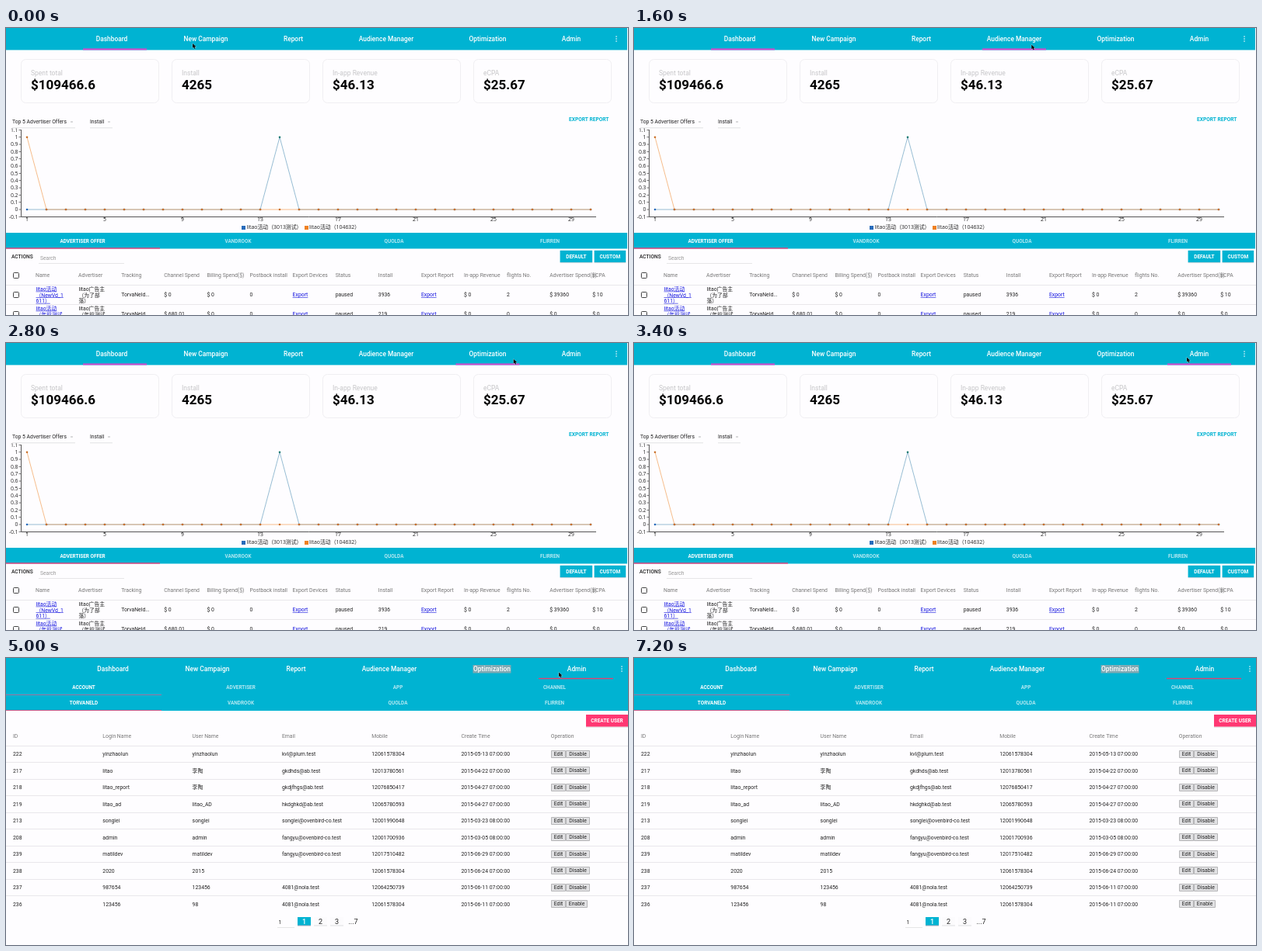
Write an HTML page with a canvas that moves like this. It is 800 by 370 pixels and loops after 7300 ms.

```html
<!DOCTYPE html>
<html lang="zh-CN">
<head>
<meta charset="utf-8">
<title>Campaign dashboard</title>
<style>
html, body { margin: 0; width: 100%; height: 100%; overflow: hidden; background: #fefdff; }
canvas { display: block; }
</style>
</head>
<body>
<canvas id="stage" width="800" height="370"></canvas>
<script>
const ctx = document.getElementById('stage').getContext('2d');
const LOOP = 7300, STEP = 100, PAGE_SWITCH = 3500, CURSOR_GONE = 6000;
const TEAL = '#00b3d2', PINK = '#ff3873', MAGENTA = '#d548cb';
const INK = '#222', GREY = '#777', RULE = '#e4e3e6', LINK = '#1515df';
const ORANGE = '#ef8122', BLUE = '#286bbb';
const SANS = 'Roboto, "Noto Sans CJK SC", "Noto Sans CJK", sans-serif';
const CHART_FONT = '"Open Sans", "Noto Sans CJK SC", "Noto Sans CJK", sans-serif';

const NAV = ['Dashboard', 'New Campaign', 'Report', 'Audience Manager', 'Optimization', 'Admin'];
const HOME_NAV = [136, 257, 369.5, 489, 619.5, 727];
const ADMIN_NAV = [137.5, 259, 373, 493, 625, 734];
const NETWORKS = ['VANDROOK', 'QUOLDA', 'FLIRREN'];

function box(x, y, w, h, color) {
  ctx.fillStyle = color;
  ctx.fillRect(x, y, w, h);
}

// y is the vertical centre of the capitals
function text(str, x, y, o = {}) {
  const { size = 6.85, color = INK, weight = 400, align = 'left', font = SANS } = o;
  ctx.font = `${weight} ${size}px ${font}`;
  ctx.textAlign = align;
  ctx.fillStyle = color;
  ctx.fillText(str, x, y + size * 0.355);
}

function outline(x, y, w, h, color, radius = 0, fill = '') {
  ctx.beginPath();
  ctx.roundRect(x, y, w, h, radius);
  if (fill) { ctx.fillStyle = fill; ctx.fill(); }
  ctx.strokeStyle = color;
  ctx.lineWidth = 1;
  ctx.stroke();
}

function polyline(points, color, width = 0.65) {
  ctx.beginPath();
  points.forEach(([x, y]) => ctx.lineTo(x, y));
  ctx.strokeStyle = color;
  ctx.lineWidth = width;
  ctx.stroke();
}

function dot(x, y, r, color) {
  ctx.beginPath();
  ctx.arc(x, y, r, 0, Math.PI * 2);
  ctx.fillStyle = color;
  ctx.fill();
}

function link(str, x, y, size = 6.85) {
  text(str, x, y, { color: LINK, size });
  box(x, y + size * 0.355 + 0.7, ctx.measureText(str).width, 0.6, LINK);
}

function button(str, x, y, w, h, color) {
  box(x, y + h, w, 1, '#d5d5d8');
  box(x, y, w, h, color);
  text(str, x + w / 2, y + h / 2, { size: 6.5, color: '#fff', weight: 700, align: 'center' });
}

function navigation(centres, dotsX) {
  NAV.forEach((name, i) =>
    text(name, centres[i], 14, { size: 8.4, color: '#fff', weight: 500, align: 'center' }));
  [11, 14, 17].forEach(y => dot(dotsX, y, 0.8, '#fff'));
}

function tabs(names, centres, y) {
  names.forEach((name, i) => text(name, centres[i], y, {
    size: 6.4, weight: 700, align: 'center', color: i ? 'rgba(255,255,255,.7)' : '#fff'
  }));
}

function checkbox(y) {
  outline(9.5, y - 3.5, 7, 7, '#444', 1);
}

function summaryCards() {
  const cards = [['Spent total', '$109466.6'], ['Install', '4265'], ['In-app Revenue', '$46.13'], ['eCPA', '$25.67']];
  cards.forEach(([label, value], i) => {
    const x = 19.5 + i * 194;
    outline(x, 40.5, 177, 56, '#f0eff2', 6);
    text(label, x + 12.5, 58, { size: 8.5, color: '#c6c6c8' });
    text(value, x + 12.5, 72.7, { size: 17, color: '#000', weight: 700 });
  });
}

function dropdown(label, x, width) {
  text(label, x, 120.7, { size: 6.8 });
  box(x, 128.5, width, 0.7, '#d5d5d8');
  box(x + width - 6, 120.5, 3, 1, '#b5b5b8');
}

function chart() {
  const px = day => 27 + (day - 1) * 25, py = v => 234 - v * 93.3;
  const label = { size: 6.8, font: CHART_FONT, color: '#222' };
  ctx.save();
  ctx.beginPath();
  ctx.rect(0, 129.5, 800, 140);
  ctx.clip();
  polyline([[19.5, 131], [19.5, 243.5], [759, 243.5]], '#555', 1);
  for (let n = -1; n <= 11; n++) {
    const y = py(n / 10);
    box(16.5, y - 0.4, 3, 0.8, '#555');
    text(String(n / 10), 15.5, y, { ...label, align: 'right' });
  }
  for (let day = 1; day <= 30; day += 4) {
    box(px(day) - 0.4, 243, 0.8, 3, '#555');
    text(String(day), px(day), 247, { ...label, align: 'center' });
  }
  ctx.restore();

  const series = peak => Array.from({ length: 30 }, (_, i) => [px(i + 1), py(i + 1 === peak ? 1 : 0)]);
  const blue = series(14), orange = series(1);
  polyline(blue, '#5f9abb');
  blue.forEach(([x, y]) => dot(x, y, 1.3, y < 200 ? '#17786f' : BLUE));
  polyline(orange, '#f29a4d');
  orange.forEach(([x, y]) => dot(x, y, 1.3, '#c9702a'));

  box(303, 255, 5, 5, BLUE);
  text('litao活动（3013测试）', 309.5, 257, { ...label, size: 6.9 });
  box(384, 255, 5, 5, ORANGE);
  text('litao活动（104632）', 390, 257, { ...label, size: 6.9 });
}

function offerTable() {
  const column = i => 38 + i * 55.1;
  const heads = ['Name', 'Advertiser', 'Tracking', 'Channel Spend', 'Billing Spend($)', 'Postback install',
    'Export Devices', 'Status', 'Install', 'Export Report', 'In-app Revenue', 'flights No.', 'Advertiser Spend($)', 'eCPA'];
  checkbox(319);
  heads.forEach((h, i) => text(h, column(i), 319, { color: GREY }));
  const rows = [
    [344, 'TorvaNeld...', '$ 0', '$ 0', '0', 'Export', 'paused', '3936', 'Export', '$ 0', '2', '$ 39360', '$ 10'],
    [369, 'TorvaNeld...', '$ 680.01', '$ 0', '0', 'Export', 'paused', '219', 'Export', '$ 0', '0', '$ 0', '$ 0']
  ];
  box(0, 331, 800, 0.8, RULE);
  box(0, 356, 800, 0.8, RULE);
  rows.forEach(([y, ...cells]) => {
    checkbox(y);
    cells.forEach((c, i) => (c === 'Export' ? link : text)(c, column(i + 2), y));
  });
  const nameLines = ['litao活动', '（NewVd_1', '611）'];
  const ownerLines = ['litao广告主', '（为了部', '落）'];
  nameLines.forEach((s, i) => link(s, 38.5, 336.5 + i * 7.6, 6.8));
  ownerLines.forEach((s, i) => text(s, 93.5, 336.5 + i * 7.6, { size: 6.8 }));
  ['litao活动', '（年前测试'].forEach((s, i) => link(s, 38.5, 361.5 + i * 7.6, 6.8));
  ['litao广告主', '（年前测试'].forEach((s, i) => text(s, 93.5, 361.5 + i * 7.6, { size: 6.8 }));
}

function cursorAt(t) {
  const keys = [[0, 240, 20], [1000, 428, 20], [2200, 594.5, 23], [3400, 711, 18.5]];
  const last = keys[keys.length - 1];
  if (t >= last[0]) return { x: last[1], y: last[2] };
  const i = keys.findIndex(k => k[0] > t);
  const [t0, x0, y0] = keys[i - 1], [t1, x1, y1] = keys[i];
  const p = (t - t0) / (t1 - t0);
  return { x: x0 + (x1 - x0) * p, y: y0 + (y1 - y0) * p };
}

function drawCursor({ x, y }) {
  const shape = [[0, 0], [0, 5.8], [1.4, 4.7], [2.5, 6.9], [3.6, 6.3], [2.6, 4.3], [4.4, 4.1]];
  ctx.beginPath();
  shape.forEach(([dx, dy]) => ctx.lineTo(x + dx, y + dy));
  ctx.closePath();
  ctx.strokeStyle = 'rgba(255,255,255,.5)';
  ctx.lineWidth = 1;
  ctx.stroke();
  ctx.fillStyle = '#080808';
  ctx.fill();
}

function homePage(t, cursor) {
  box(0, 0, 799, 28.4, TEAL);
  navigation(HOME_NAV, 785);
  box(99, 26.4, 82, 2, MAGENTA);
  const hovered = HOME_NAV.findIndex((c, i) => i && Math.abs(cursor.x - c) < 59.8);
  if (hovered > 0) {
    ctx.globalAlpha = Math.min(1, t / 300);
    box(HOME_NAV[hovered] - 41, 26.4, 82, 2, MAGENTA);
    ctx.globalAlpha = 1;
  }
  summaryCards();
  dropdown('Top 5 Advertiser Offers', 8, 81);
  dropdown('Install', 108, 29);
  text('EXPORT REPORT', 724, 117.2, { size: 6.6, color: TEAL, weight: 700 });
  chart();
  box(0, 264, 799, 20.5, TEAL);
  tabs(['ADVERTISER OFFER', ...NETWORKS], [98.5, 298.5, 499, 699.5], 274.5);
  box(0, 283.3, 198, 1.3, PINK);
  text('ACTIONS', 7, 295, { size: 6.6, weight: 500 });
  text('Search', 44, 296.7, { size: 6.7, color: '#999' });
  box(42, 303, 110, 0.7, '#ddd');
  button('DEFAULT', 712.6, 286.8, 41.6, 15.3, TEAL);
  button('CUSTOM', 756.6, 286.8, 40.6, 15.3, TEAL);
  offerTable();
}

const USERS = [
  ['222', 'yinzhaolun', 'yinzhaolun', 'kvl@plum.test', '12061578304', '05-13 07'],
  ['217', 'litao', '李陶', 'gkdhds@ab.test', '12013780561', '04-22 07'],
  ['218', 'litao_report', '李陶', 'gkdjfhgs@ab.test', '12076850417', '04-27 07'],
  ['219', 'litao_ad', 'litao_AD', 'hkdghkd@ab.test', '12065780593', '04-27 07'],
  ['213', 'songlei', 'songlei', 'songlei@ovenbird-co.test', '12001990648', '03-23 08'],
  ['208', 'admin', 'admin', 'fangyu@ovenbird-co.test', '12001700936', '03-05 08'],
  ['239', 'matildev', 'matildev', 'fangyu@ovenbird-co.test', '12017510482', '06-29 07'],
  ['238', '2020', '2015', '', '12061578304', '06-24 07'],
  ['237', '987654', '123456', '4081@nola.test', '12064250739', '06-11 07'],
  ['236', '123456', '98', '4081@nola.test', '12061578304', '06-11 07']
];

function smallButton(str, x, y, w) {
  outline(x + 0.5, y - 4.5, w - 1, 9, '#b5b5b7', 0, '#e2e2e4');
  text(str, x + w / 2, y, { align: 'center' });
}

function pagination() {
  text('1', 350.5, 341, { size: 6.8 });
  box(349, 347, 22, 0.7, '#ddd');
  for (let i = 0; i < 3; i++) {
    const x = 375 + i * 21;
    box(x, 334.5, 17, 11, i ? '#e0dfe2' : '#aab');
    box(x, 334, 17, 10.5, i ? '#fcfbfd' : TEAL);
    text(String(i + 1), x + 8.5, 339.5, { size: 9, align: 'center', color: i ? INK : '#fff', weight: i ? 400 : 500 });
  }
  text('...7', 440.5, 339.5, { size: 9 });
}

function adminPage() {
  const column = i => 9 + i * 115.3;
  box(0, 0, 800, 68, TEAL);
  box(600.5, 9, 49, 10.5, '#80aab4');
  navigation(ADMIN_NAV, 792);
  box(685, 25.8, 96, 1.4, '#e5406f');
  tabs(['ACCOUNT', 'ADVERTISER', 'APP', 'CHANNEL'], [100, 302, 504, 705.5], 38);
  tabs(['TORVANELD', ...NETWORKS], [100, 302, 504, 705.5], 58);
  box(0, 47, 200, 0.9, '#b96b98');
  box(0, 67, 200, 1, '#d05a87');
  button('CREATE USER', 746, 73, 54, 15.5, PINK);
  ['ID', 'Login Name', 'User Name', 'Email', 'Mobile', 'Create Time', 'Operation']
    .forEach((h, i) => text(h, column(i), 100.5, { color: GREY }));
  USERS.forEach((user, row) => {
    const y = 123.8 + row * 21.5;
    box(0, Math.round(y - 11), 800, 0.8, RULE);
    user.forEach((cell, i) => text(i === 5 ? `2015-${cell}:00:00` : cell, column(i), y));
    const enable = row === USERS.length - 1;
    smallButton('Edit', 701, Math.round(y), 19);
    smallButton(enable ? 'Enable' : 'Disable', 720, Math.round(y), enable ? 28 : 31);
  });
  pagination();
}

function draw(now) {
  const t = Math.floor((now % LOOP) / STEP) * STEP;
  const cursor = cursorAt(t);
  box(0, 0, 800, 370, '#fefdff');
  if (t < PAGE_SWITCH) homePage(t, cursor);
  else adminPage();
  if (t < CURSOR_GONE) drawCursor(cursor);
}

const start = performance.now();
function frame() {
  draw(performance.now() - start);
  requestAnimationFrame(frame);
}
frame();
</script>
</body>
</html>
```
